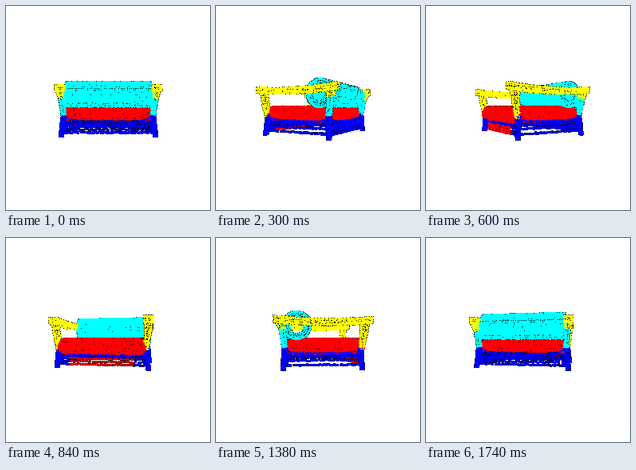
Animation, 256 px wide and 256 px high, one loop 1.8 s. Source, as a matplotlib script:

```python
import numpy as np
import matplotlib.pyplot as plt
from matplotlib.animation import FuncAnimation

SIZE, FRAMES, INTERVAL = 256, 30, 60
CAMERA = 260.0
CYAN, YELLOW, RED, BLUE = (0, 255, 255), (255, 255, 0), (255, 0, 0), (0, 0, 255)

rng = np.random.default_rng(4)
clouds, tints = [], []


def patch(color, wide, high, step, surface):
    """Sample surface(u, v) on a lightly jittered grid."""
    n, m = max(2, round(wide / step)), max(2, round(high / step))
    u, v = np.meshgrid((np.arange(n) + 0.5) / n, np.linspace(0, 1, m))
    u = (u + rng.uniform(-0.4, 0.4, u.shape) / n).ravel()
    v = np.clip(v + rng.uniform(-0.35, 0.35, v.shape) / m, 0, 1).ravel()
    pts = np.stack(np.broadcast_arrays(*surface(u, v)), axis=1)
    clouds.append(pts)
    tints.append(np.tile(np.array(color, np.uint8), (len(pts), 1)))


def around(u, a0, a1, b0, b1):
    """Walk once round a rectangle as u goes from 0 to 1."""
    a, b = abs(a1 - a0), abs(b1 - b0)
    stops = np.array([0, a, a + b, 2 * a + b, 2 * (a + b)]) / (2 * (a + b))
    return (np.interp(u, stops, [a0, a1, a1, a0, a0]),
            np.interp(u, stops, [b0, b0, b1, b1, b0]))


def post(color, low, z0, high, z1, step):
    """Open prism between two rectangles (x0, x1, y0, y1)."""
    def wall(u, v):
        xa, ya = around(u, *low)
        xb, yb = around(u, *high)
        return xa + (xb - xa) * v, ya + (yb - ya) * v, z0 + (z1 - z0) * v
    girth = 2 * (abs(low[1] - low[0]) + abs(low[3] - low[2]))
    patch(color, girth, z1 - z0, step, wall)


def sheet(color, x0, x1, y0, y1, z, step):
    patch(color, abs(x1 - x0), abs(y1 - y0), step,
          lambda u, v: (x0 + (x1 - x0) * u, y0 + (y1 - y0) * v, z))


def band(color, p, q, z0, z1, step, rise=0):
    """Upright strip from p to q whose top edge rises at both ends."""
    def strip(u, v):
        top = z1 + rise * (2 * u - 1) ** 6
        return (p[0] + (q[0] - p[0]) * u, p[1] + (q[1] - p[1]) * u,
                z0 + (top - z0) * v)
    patch(color, np.hypot(q[0] - p[0], q[1] - p[1]), z1 - z0, step, strip)


def arm(side):
    def surface(u, v):
        x, drop = around(u, 46, 54, -5.5, 0)
        y = -50 + 99 * v
        return side * x, y, 21.5 + 2.5 * (y / 50) ** 2 + drop
    patch(YELLOW, 27, 99, 1.7, surface)


def bolster():
    def tube(u, v):
        a = 2 * np.pi * u
        return -46 + 92 * v, 27 + 14 * np.cos(a), 15.5 + 14 * np.sin(a)
    patch(CYAN, 88, 92, 1.5, tube)
    for x in (-46, 46):
        def cap(u, v):
            a, r = 2 * np.pi * u, 9 + 5 * v
            return x, 27 + r * np.cos(a), 15.5 + r * np.sin(a)
        patch(CYAN, 70, 5, 1.6, cap)


def cushion():
    def edge(u, v):
        t = 2 * v - 1
        inset = 7 * (1 - np.sqrt(1 - t * t))
        x, y = around(u, -1, 1, -1, 1)
        return x * (47 - inset), -3.5 + y * (40 - inset), -6.5 + 8.5 * t
    patch(RED, 340, 24, 1.4, edge)
    sheet(RED, -40, 40, -36, 30, 2, 1.5)
    sheet(RED, -40, 40, -36, 30, -15, 1.8)


def build():
    bolster()
    cushion()
    for y in (45, 42):
        patch(CYAN, 98, 17, 1.9,
              lambda u, v: (-49 + 98 * u, y - 4 * (1 - v), 2 + 18 * v))
    for s in (-1, 1):
        arm(s)
        # front post, back post and its yellow head
        post(YELLOW, (s * 46, s * 49.5, -42, -38.5), -9,
             (s * 47, s * 53.5, -47, -40), 19, 1.7)
        post(CYAN, (s * 46, s * 49.5, 37, 41), -7,
             (s * 47, s * 51.5, 39, 44), 11, 1.6)
        post(YELLOW, (s * 47, s * 51.5, 39, 44), 11,
             (s * 47, s * 54, 40, 48), 20, 1.7)
        for y in (-1, 1):
            post(BLUE, (s * 48.5, s * 51.5, y * 39, y * 42), -29.5,
                 (s * 46, s * 49.5, y * 36.5, y * 41), -8, 1.5)
        # side rails
        band(BLUE, (s * 47, -40), (s * 47, 40), -17, -13, 1.5, 4)
        for x in (46, 48):
            band(BLUE, (s * x, -39), (s * x, 39), -25.5, -20, 2.4)
        for x0, x1 in ((0, 35), (35, 46)):
            band(RED if x0 == 0 else BLUE, (s * x0, -40), (s * x1, -40),
                 -26, -19.5, 1.9)
    for y in (-39, 39):
        band(BLUE, (-46, y), (46, y), -18, -14, 1.5, 5)
    for y in (38, 40):
        band(BLUE, (-47, y), (47, y), -26, -19.5, 2.4)


build()
xyz, rgb = np.concatenate(clouds), np.concatenate(tints)

# each ball: a coloured cross with four dark corners behind it
CROSS = [(0, 0), (1, 0), (-1, 0), (0, 1), (0, -1)]
CORNERS = [(1, 1), (1, -1), (-1, 1), (-1, -1)]
offsets = np.array(CROSS + CORNERS)
lift = np.array([1.0] + [0.5] * 4 + [-3.5] * 4)
ball_rgb = np.repeat(rgb[None], 9, axis=0)
ball_rgb[5:] = 0
ball_rgb = ball_rgb.reshape(-1, 3)


def render(i):
    a = 2 * np.pi * i / FRAMES
    x, y, z = xyz.T
    across = x * np.cos(a) + y * np.sin(a)
    depth = y * np.cos(a) - x * np.sin(a)
    zoom = CAMERA / (CAMERA - depth)
    px = np.rint(SIZE / 2 + across * zoom).astype(int)
    py = np.rint(SIZE / 2 - z * zoom).astype(int)
    cols = (px + offsets[:, :1]).ravel()
    rows = (py + offsets[:, 1:]).ravel()
    order = np.argsort((depth + lift[:, None]).ravel(), kind="stable")
    img = np.full((SIZE, SIZE, 3), 255, np.uint8)
    img[rows[order], cols[order]] = ball_rgb[order]
    return img


fig = plt.figure(figsize=(2.56, 2.56), dpi=100, facecolor="white")
ax = fig.add_axes([0, 0, 1, 1])
ax.axis("off")
view = ax.imshow(render(0), interpolation="nearest", aspect="auto")


def update(i):
    view.set_data(render(i))
    return (view,)


anim = FuncAnimation(fig, update, frames=FRAMES, interval=INTERVAL,
                     repeat=True, repeat_delay=0, blit=False)
plt.show()
```
